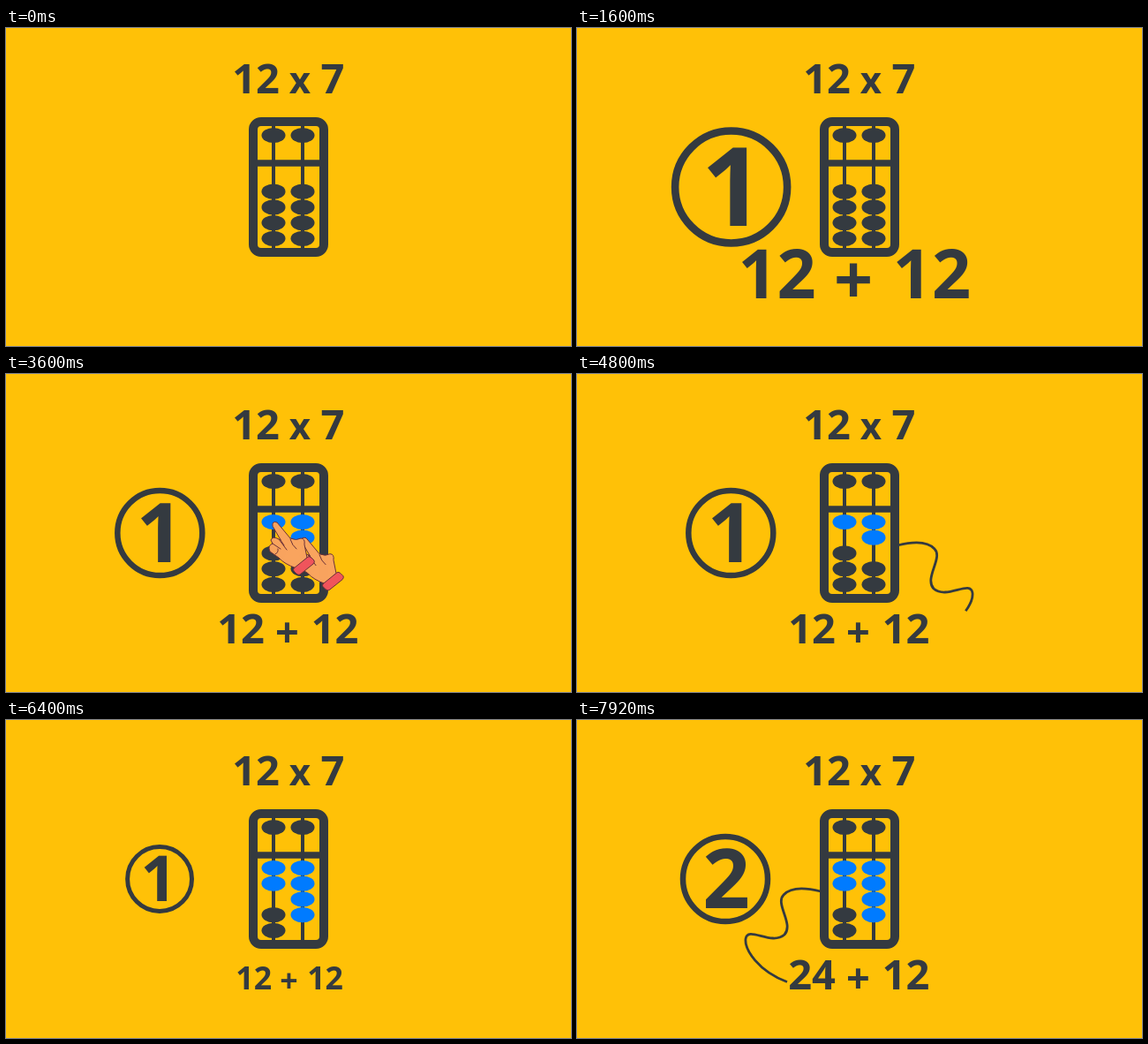
An HTML page for the animation above (8 s loop, 640x360 px).

```html
<!DOCTYPE html>
<html lang="en">
<head>
<meta charset="utf-8">
<title>Abacus multiplication</title>
<style>
  html, body { margin: 0; width: 100%; height: 100%; overflow: hidden; background: #ffc107; }
  svg { display: block; width: 100%; height: 100%; }
  text { font: 700 47px "Open Sans", "Noto Sans", sans-serif; fill: #343a40; text-anchor: middle; }
  #digit { font-size: 94px; }
  #times { font-size: 42px; }
  .ink { fill: none; stroke: #343a40; }
</style>
</head>
<body>
<svg viewBox="0 0 640 360">
  <defs>
    <path id="squiggle" pathLength="1" d="M238 296.5C205 284 190 260 191 248C193 232 220 256 235 243C246 231 224 208 234 198C243 188 260 190 276 194"/>
    <g id="hand" stroke="#6b3038" stroke-width="1" stroke-linejoin="round" stroke-linecap="round">
      <path fill="#f9a45f" d="M302 172Q301 166 307 168L322 186Q329 189 334 186Q339 186 338 193L341 208L329 220Q315 215 309 208L299 201Q296 194 302 192L300 188Q302 183 309 187L311 188Z"/>
      <path fill="none" d="M311 188L315 194M302 192L311 198M309 187L318 199M322 187Q324 194 329 198M305 204Q309 202 308 198"/>
      <path fill="#f0545c" d="M326 220L342 207Q344 206 346 208L349 211Q350 213 348 215L333 227Q331 228 329 226L326 223Q325 222 326 220Z"/>
    </g>
  </defs>
  <rect width="640" height="360" fill="#ffc107"/>
  <text x="283" y="74">12</text>
  <text id="times" x="333" y="74">x</text>
  <text x="370" y="74">7</text>
  <g class="ink">
    <path stroke-width="4" d="M303 106V254M336 106V254"/>
    <path stroke-width="7.5" d="M280 153H360"/>
    <rect x="280" y="106" width="80" height="148" rx="9" stroke-width="10"/>
  </g>
  <g id="beads"></g>
  <g class="ink" stroke-width="2.8">
    <use id="leftLine" href="#squiggle"/>
    <use id="rightLine" href="#squiggle" transform="translate(639 0) scale(-1 1)"/>
  </g>
  <circle id="ring" class="ink" r="48" cy="180" stroke-width="6.5"/>
  <text id="digit"></text>
  <g id="sum">
    <text id="addend" x="266" y="305"></text>
    <text x="318.5" y="309">+</text>
    <text x="372.5" y="305">12</text>
  </g>
  <use id="rightHand" href="#hand"/>
  <use id="leftHand" href="#hand"/>
</svg>
<script>
const LOOP = 8000, PITCH = 17.7, COLUMNS = [303, 336];
const DARK = [52, 58, 64], BLUE = [0, 123, 255];
const $ = id => document.getElementById(id);
const ramp = (t, from, to) => Math.min(1, Math.max(0, (t - from) / (to - from)));
const smooth = p => p * p * (3 - 2 * p);
const mix = (a, b, p) => a + (b - a) * p;

function addBead(x, y) {
  const bead = document.createElementNS("http://www.w3.org/2000/svg", "ellipse");
  const attrs = { cx: x, cy: y, rx: 13.5, ry: 8.6, fill: "#343a40" };
  for (const key in attrs) bead.setAttribute(key, attrs[key]);
  return $("beads").appendChild(bead);
}

const lowerBeads = COLUMNS.map(x => {
  addBead(x, 121.5);
  return [0, 1, 2, 3].map(i => addBead(x, 185.2 + i * PITCH));
});

// Each addition pushes up one more bead on the left rod and two on the right.
const additions = [
  { appear: 3160, push: 3280, leave: 3600 },
  { appear: 4960, push: 5200, leave: 5600 }
];
const lift = (t, step) => smooth(ramp(t, step.push, step.push + 240));

function drawBeads(t) {
  lowerBeads.forEach((column, c) => column.forEach((bead, i) => {
    const step = additions[Math.floor(i / (c + 1))];
    const p = step ? lift(t, step) : 0;
    bead.setAttribute("cy", 185.2 + (i - p) * PITCH);
    bead.setAttribute("fill", `rgb(${DARK.map((v, k) => Math.round(mix(v, BLUE[k], p)))})`);
  }));
}

function drawHands(t) {
  const n = t < 4200 ? 0 : 1, step = additions[n];
  const alpha = ramp(t, step.appear, step.appear + 120) * (1 - ramp(t, step.leave, step.leave + 400));
  const drop = 1 - lift(t, step);
  const place = (id, dx, rows) => {
    $(id).setAttribute("transform", `translate(${dx} ${(rows + drop) * PITCH})`);
    $(id).setAttribute("opacity", alpha);
  };
  place("leftHand", 0, n);
  place("rightHand", 33, 1 + 2 * n);
}

function drawLine(id, t, start) {
  const head = ramp(t, start, start + 480);
  const tail = ramp(t, start + 570, start + 980);
  const line = $(id);
  line.style.visibility = head > tail ? "visible" : "hidden";
  line.setAttribute("stroke-dasharray", `${head - tail} 2`);
  line.setAttribute("stroke-dashoffset", -tail);
}

// Grows linearly to the peak, then drops back to full size.
const pop = (t, start, peak) => t < start + 250
  ? peak * ramp(t, start, start + 250)
  : mix(peak, 1, ramp(t, start + 250, start + 490));

function drawLabels(t) {
  const second = t >= 6499;
  const cx = second ? 168 : 174.3;
  const scale = peak => second ? pop(t, 6499, peak)
    : pop(t, 1266, peak) * (1 - ramp(t, 6370, 6499));
  const zoom = (id, x, y, s) =>
    $(id).setAttribute("transform", `translate(${x} ${y}) scale(${s}) translate(${-x} ${-y})`);

  $("ring").setAttribute("cx", cx);
  $("digit").setAttribute("x", second ? 169 : cx);
  $("digit").setAttribute("y", 213);
  $("digit").textContent = second ? "2" : "1";
  $("addend").textContent = second ? "24" : "12";
  zoom("ring", cx - 1, 180, scale(1.5));
  zoom("digit", cx - 6, 180, scale(1.5));
  zoom("sum", 327, 303, scale(2));
}

function draw(t) {
  drawBeads(t);
  drawHands(t);
  drawLine("leftLine", t, t < 5000 ? 2536 : 7400);
  drawLine("rightLine", t, 4136);
  drawLabels(t);
}

const begin = performance.now();
function tick() {
  draw((performance.now() - begin) % LOOP);
  requestAnimationFrame(tick);
}
tick();
</script>
</body>
</html>
```
